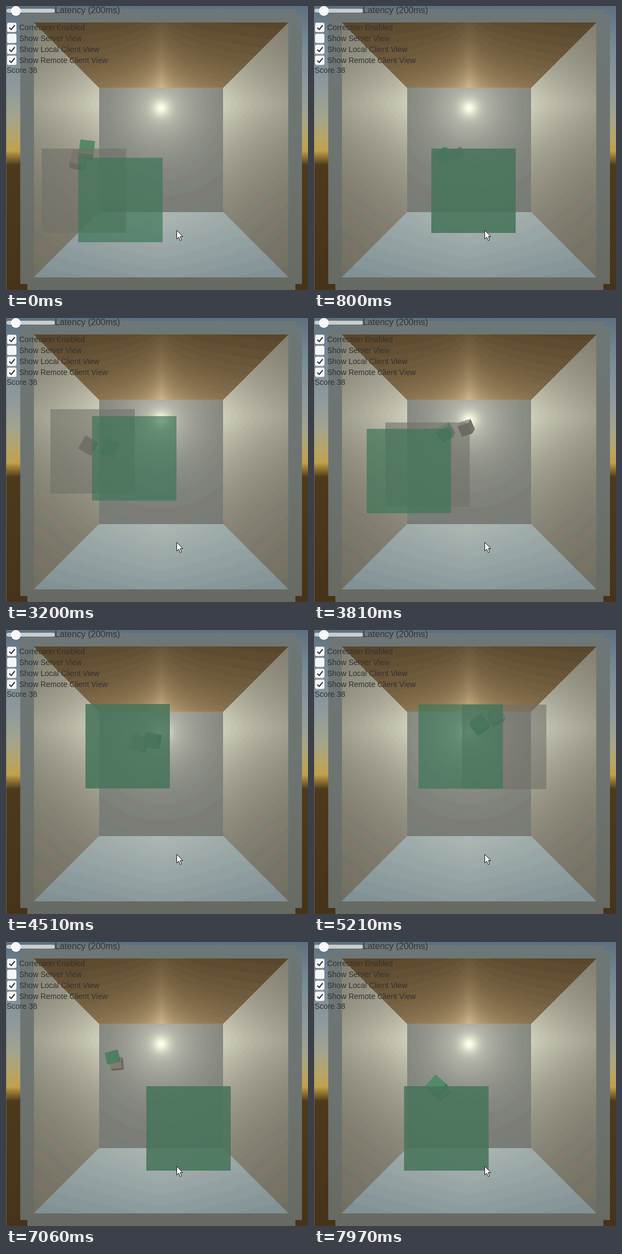
An HTML page with a canvas for the animation above (8 s loop, 551 by 518 pixels).

```html
<!DOCTYPE html>
<html>
<head>
<meta charset="utf-8">
<style>
  html, body { margin: 0; width: 100%; height: 100%; overflow: hidden; }
  canvas { display: block; }
</style>
</head>
<body>
<canvas id="stage" width="551" height="518"></canvas>
<script>
const W = 551, H = 518, LOOP = 8000, PADDLE = 154, PADDLE_LAG = 200, CUBE_LAG = 150;
const ctx = document.getElementById('stage').getContext('2d');

// Stops as time, x, y and an optional rest in ms. Green parts repeat the grey ones later.
const paddleStops = [
  [-340, 200, 294], [-60, 65, 260, 340], [550, 214, 260, 350], [1200, 283, 260, 930],
  [2450, 157, 179, 550], [3300, 55, 162], [3640, 97, 203], [4050, 185, 170],
  [4260, 145, 135, 520], [5560, 361, 137], [5700, 348, 137, 180], [6130, 115, 263],
  [6550, 284, 365], [6800, 256, 263, 450], [7600, 164.5, 263]
];
const cubeStops = [
  [-150, 147, 262], [0, 132, 281], [1700, 405, 258], [2080, 335, 251], [3050, 189, 237],
  [3250, 137, 231], [4000, 325, 190], [4650, 221, 211], [5500, 390, 131],
  [6250, 160, 157], [7060, 202, 222], [7970, 229, 272]
];

const linear = k => k;
const smooth = k => k * k * (3 - 2 * k);
const mix = (a, b, k) => a.map((v, i) => v + (b[i] - v) * k);

function positionAt(stops, t, ease) {
  const next = stops.findIndex(stop => stop[0] > t);
  if (next < 0) return stops[stops.length - 1].slice(1, 3);
  const [time, x, y, rest = 0] = stops[Math.max(0, next - 1)];
  const [end, endX, endY] = stops[next];
  const k = Math.min(1, Math.max(0, (t - time - rest) / (end - time - rest)));
  return mix([x, y], [endX, endY], ease(k));
}

// Colour of the lit room at a pixel, measured from the vanishing point
function roomColor(x, y) {
  const dx = x - 283, dy = y - 262.5, ax = Math.abs(dx), ay = Math.abs(dy);
  const depth = (Math.max(ax, ay) - 113.5) / 118.5;
  if (depth < 0) {
    const r = Math.hypot(dx, y - 186);
    const glow = 95 * Math.exp(-r / 70) + 45 * Math.exp(-((r / 16) ** 2));
    return [116 + glow, 118 + glow, 114 + glow * 0.86];
  }
  if (ax > ay) {
    const reach = Math.hypot(y - 178, 14) / 165;
    return mix([106, 102, 90], [214, 214, 194], Math.exp(-reach - 0.6 * depth));
  }
  if (dy < 0) {
    const base = mix([111, 90, 58], [86, 67, 41], depth);
    const spread = Math.sqrt(Math.hypot(dx, 5) / 80);
    return mix(base, [222, 196, 150], Math.exp(-1.3 * spread - 1.8 * depth) * 1.2);
  }
  const side = ax / (113.5 + 118.5 * depth);
  return mix([122, 138, 143], [173, 184, 180], 1 - 0.65 * depth - 0.25 * side);
}

function vertical(c, stops) {
  const gradient = c.createLinearGradient(0, 0, 0, H);
  stops.forEach(([y, color]) => gradient.addColorStop(y / H, color));
  return gradient;
}

function drawText(c, text, x, y, size) {
  c.font = size + 'px "Liberation Sans", Arial, sans-serif';
  c.fillStyle = '#323232';
  c.fillText(text, x, y);
}

function roundBox(c, x, y, w, h, r, color) {
  c.fillStyle = color;
  c.beginPath();
  c.roundRect(x, y, w, h, r);
  c.fill();
}

function drawRoom(c) {
  c.fillStyle = vertical(c, [
    [0, '#5d7080'], [70, '#778a94'], [150, '#8f9a9d'], [205, '#a5a48c'], [240, '#b5a566'],
    [264, '#c0a04b'], [278, '#86692f'], [290, '#4d3a1c'], [H, '#47331a']
  ]);
  c.fillRect(0, 0, W, H);
  c.fillStyle = vertical(c, [[0, '#6d7777'], [250, '#6e7471'], [H, '#666a62']]);
  c.fillRect(26, 17, 514, 490);
  c.fillRect(38, 6, 492, 400);
  c.fillRect(39, 400, 489, 118);
  c.fillStyle = 'rgba(110,120,122,.7)';
  c.fillRect(0, 0, 1, H);

  const left = 51, top = 30, image = c.createImageData(464, 465);
  for (let y = 0; y < image.height; y++) {
    for (let x = 0; x < image.width; x++) {
      const rgb = roomColor(left + x + 0.5, top + y + 0.5).map(v => Math.round(v / 5) * 5);
      image.data.set([...rgb, 255], (y * image.width + x) * 4);
    }
  }
  c.putImageData(image, left, top);
}

function drawControls(c) {
  roundBox(c, 1, 5, 88, 7, 3.5, '#c9cdcd');
  roundBox(c, 9, 0, 18, 18, 9, '#f7f7f7');
  drawText(c, 'Latency (200ms)', 89, 13, 16);
  const options = [
    ['Correction Enabled', true], ['Show Server View', false],
    ['Show Local Client View', true], ['Show Remote Client View', true]
  ];
  options.forEach(([label, checked], i) => {
    const y = 30.5 + i * 20;
    roundBox(c, 2, y, 17, 17, 3, '#f5f5f5');
    if (checked) {
      c.strokeStyle = '#323232';
      c.lineWidth = 2;
      c.beginPath();
      c.moveTo(6, y + 9);
      c.lineTo(9.5, y + 12.5);
      c.lineTo(16, y + 4.5);
      c.stroke();
    }
    drawText(c, label, 24, y + 13.5, 14);
  });
  drawText(c, 'Score 38', 1, 122, 14);
}

function drawPolygon(points, fill) {
  ctx.beginPath();
  points.forEach(([x, y]) => ctx.lineTo(x, y));
  ctx.closePath();
  ctx.fillStyle = fill;
  ctx.fill();
}

const turn = (a, b, angle) => [
  a * Math.cos(angle) - b * Math.sin(angle), a * Math.sin(angle) + b * Math.cos(angle)
];

// A tumbling cube that looks smaller when it is near the back wall
function drawCube(t, dark, light) {
  const [x, y] = positionAt(cubeStops, t, linear);
  const edge = 20 + 7 * Math.abs(Math.cos(Math.PI * t / 1560));
  const roll = (15 + 0.061 * t) * Math.PI / 180;
  const pitch = 0.4 * Math.cos(t / 400), yaw = 0.25 * Math.sin(t / 520);
  const rotate = ([px, py, pz]) => {
    [px, py] = turn(px, py, roll);
    [px, pz] = turn(px, pz, yaw);
    [py, pz] = turn(py, pz, pitch);
    return [px, py, pz];
  };
  const onAxes = (axis, values) => [0, 1, 2].map(i => values[(i - axis + 3) % 3]);
  for (let axis = 0; axis < 3; axis++) {
    for (const sign of [-1, 1]) {
      const normal = rotate(onAxes(axis, [sign, 0, 0]));
      if (normal[2] <= 0) continue;
      const corners = [[-1, -1], [1, -1], [1, 1], [-1, 1]].map(([a, b]) => {
        const corner = rotate(onAxes(axis, [sign, a, b]));
        return [x + corner[0] * edge / 2, y + corner[1] * edge / 2];
      });
      const lit = Math.min(1, Math.max(0, 0.25 - 0.6 * normal[1] - 0.2 * normal[0]));
      drawPolygon(corners, `rgb(${mix(dark, light, lit).map(Math.round)})`);
    }
  }
}

function drawPaddle(t, color) {
  const [x, y] = positionAt(paddleStops, t, smooth);
  ctx.fillStyle = color;
  ctx.fillRect(x, y, PADDLE, PADDLE);
}

function drawCursor() {
  const arrow = [[0, 0], [0, 16], [3.7, 12.6], [6.3, 18.8], [8.8, 17.7], [6.3, 11.6], [11, 11.6]];
  drawPolygon(arrow.map(([x, y]) => [311.5 + x, 409 + y]), '#fff');
  ctx.strokeStyle = '#111';
  ctx.lineWidth = 1;
  ctx.stroke();
}

function layer(draw) {
  const canvas = document.createElement('canvas');
  canvas.width = W;
  canvas.height = H;
  draw(canvas.getContext('2d'));
  return canvas;
}

const room = layer(drawRoom), controls = layer(drawControls);
const start = performance.now();

function render(now) {
  const t = Math.max(0, now - start) % LOOP;
  ctx.drawImage(room, 0, 0);
  drawCube(t, [102, 96, 89], [172, 169, 160]);
  drawCube(t - CUBE_LAG, [66, 110, 83], [108, 170, 130]);
  drawPaddle(t, 'rgba(112,112,104,.6)');
  drawPaddle(t - PADDLE_LAG, 'rgba(62,118,88,.69)');
  ctx.drawImage(controls, 0, 0);
  drawCursor();
  requestAnimationFrame(render);
}
render(start);
</script>
</body>
</html>
```
